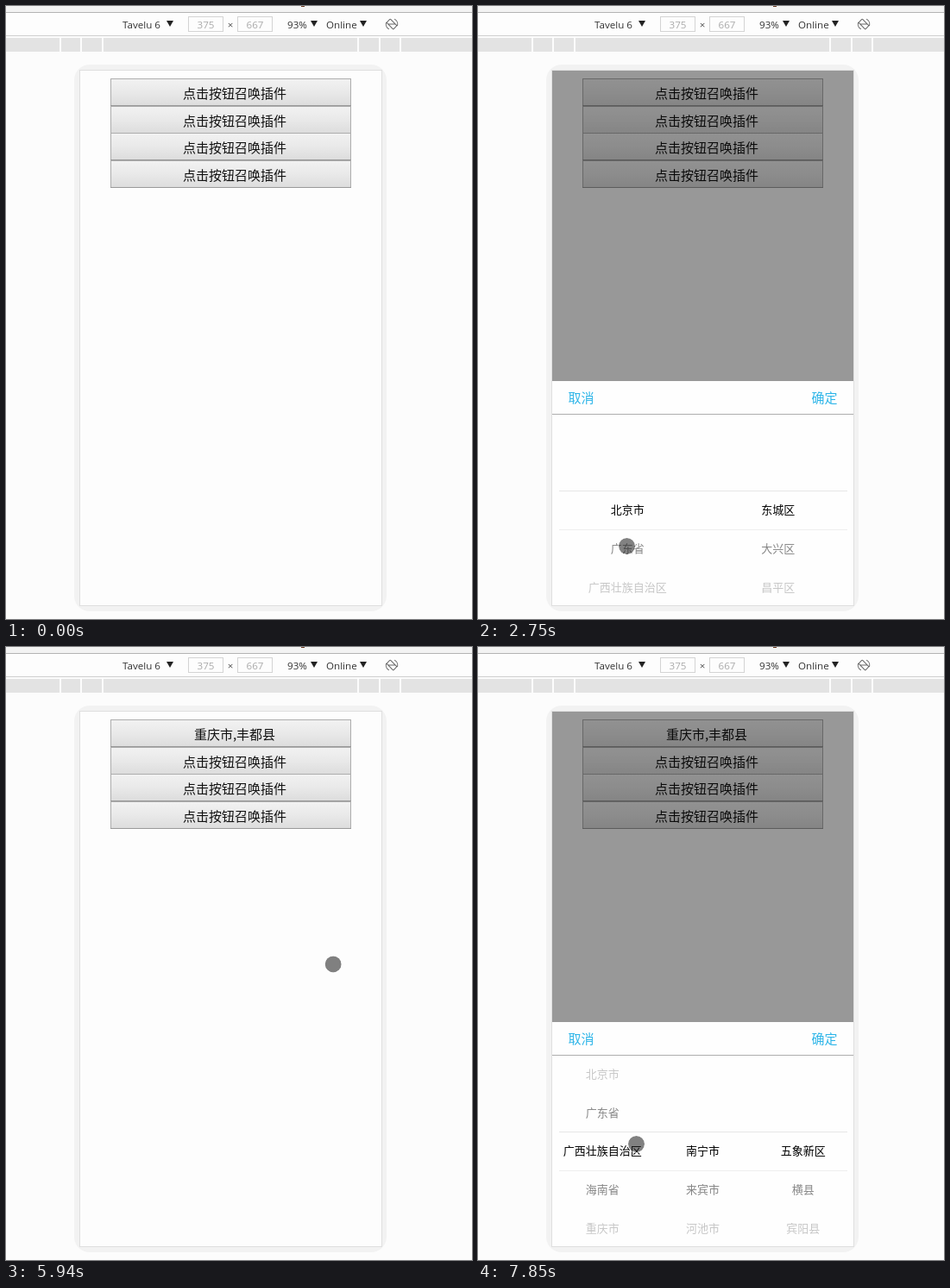
These frames come from a looping animation (540x711 px, 8000 ms). An HTML page with a canvas:

```html
<!DOCTYPE html>
<html lang="zh-CN">
<head>
<meta charset="utf-8">
<title>Picker</title>
<style>
html, body { margin: 0; width: 100%; height: 100%; overflow: hidden; background: #fcfcfc; }
canvas { display: block; }
</style>
</head>
<body>
<canvas id="stage" width="540" height="711"></canvas>
<script>
const c = document.getElementById('stage').getContext('2d');
const LOOP = 8000, ROW = 44.6;
const CJK = '"Noto Sans CJK SC", "Noto Sans CJK", sans-serif';
const LATIN = '"Open Sans", "Noto Sans", sans-serif';
const SCREEN = { x: 86, y: 75, w: 349, h: 620 };

// Runs of screen refreshes: first time, last time, count
const runs = [
  [0, 0, 1], [820, 1370, 5], [1940, 1940, 1], [2090, 2750, 6], [2900, 2900, 1],
  [3050, 3840, 7], [4110, 5110, 8], [5660, 5660, 1], [5940, 6340, 4],
  [6640, 6640, 1], [6770, 7610, 7], [7730, 7850, 2]
];
const ticks = runs.flatMap(([a, b, n]) =>
  Array.from({ length: n }, (_, i) => a + Math.floor(i * (b - a) / Math.max(1, n - 1))));

// Keyframes: time, then values
const cursorPath = [
  [820, 420, 150], [960, 330, 122], [1230, 226, 93], [1370, 236, 100], [1940, 236, 100],
  [2090, 235, 112], [2350, 215, 300], [2618, 176, 600], [2750, 172, 626], [2900, 172, 624],
  [3310, 172, 490], [3450, 190, 500], [3840, 359, 637], [3980, 359, 637], [4500, 357, 546],
  [4820, 432, 460], [5110, 416, 447], [5800, 416, 447], [6340, 272, 140], [6640, 257, 219],
  [7190, 185, 600], [7330, 182, 660], [7730, 183, 580], [7850, 183, 576]
];
const sheetTop = [
  [1800, 695], [1940, 655], [2090, 490], [2222, 435], [5659, 435],
  [5660, 695], [6500, 695], [6640, 505], [6770, 435]
];
const maskAlpha = [
  [1900, 0], [1940, .01], [2090, .25], [2222, .4], [5659, .4],
  [5660, 0], [6600, 0], [6640, .075], [6770, .35], [6910, .4]
];
const provinceScroll = [
  [2750, 0], [2900, .05], [3310, 3.1], [3700, 4],
  [6769, 4], [6770, 0], [7330, 0], [7610, 1.88], [7730, 1.97], [7850, 2]
];
const countyScroll = [[3980, 0], [4500, 1.9], [4640, 2]];

const words = s => s.split(' ');
const provinces = words('北京市 广东省 广西壮族自治区 海南省 重庆市 四川省 贵州省');
const beijing = words('东城区 大兴区 昌平区');
const chongqing = words('万州区 垫江县 丰都县 城口县 梁平县');
const cities = words('南宁市 来宾市 河池市');
const counties = words('五象新区 横县 宾阳县');

function at(track, t) {
  if (t <= track[0][0]) return track[0].slice(1);
  const i = track.findIndex(k => k[0] > t);
  if (i < 0) return track[track.length - 1].slice(1);
  const a = track[i - 1], b = track[i], u = (t - a[0]) / (b[0] - a[0]);
  return a.slice(1).map((v, j) => v + (b[j + 1] - v) * u);
}

function rect(x, y, w, h, fill) {
  c.fillStyle = fill;
  c.fillRect(x, y, w, h);
}

function frame(x, y, w, h, stroke) {
  c.strokeStyle = stroke;
  c.lineWidth = 1;
  c.strokeRect(x + .5, y + .5, w - 1, h - 1);
}

function clipTo(x, y, w, h) {
  c.save();
  c.beginPath();
  c.rect(x, y, w, h);
  c.clip();
}

// y is the visual middle of the line
function text(s, x, y, size, color, align = 'center', family = CJK) {
  c.font = `${size}px ${family}`;
  c.textAlign = align;
  c.fillStyle = color;
  c.fillText(s, x, y + size * .37);
}

function arrow(x) {
  c.fillStyle = '#222';
  c.beginPath();
  c.moveTo(x, 17);
  c.lineTo(x + 8, 17);
  c.lineTo(x + 4, 24);
  c.fill();
}

function rotateIcon() {
  c.save();
  c.translate(447, 21);
  c.rotate(-Math.PI / 4);
  c.strokeStyle = '#666';
  c.lineWidth = 1;
  c.beginPath();
  c.roundRect(-3, -5.5, 6, 11, 1);
  c.moveTo(-3, -3);
  c.lineTo(3, 3);
  c.stroke();
  for (const start of [-.3, Math.PI - .3]) {
    c.beginPath();
    c.arc(0, 0, 6.7, start, start + 1.4);
    c.stroke();
  }
  c.restore();
}

function toolbar() {
  rect(0, 0, 540, 7, '#f3f3f3');
  rect(342, 0, 4, 1, '#6b3a20');
  rect(0, 7, 540, 1, '#b4b4b4');
  rect(0, 8, 540, 26, '#fdfdfd');
  rect(0, 34, 540, 1, '#cfcfcf');
  rect(0, 37, 540, 16, '#e3e3e3');
  for (const x of [62, 86, 111, 407, 432, 456]) rect(x, 37, 2, 16, '#fcfcfc');
  const label = (s, x, color = '#333', align = 'left') => text(s, x, 21.5, 11.6, color, align, LATIN);
  label('Tavelu 6', 135);
  label('93%', 326);
  label('Online', 371);
  label('×', 260, '#555', 'center');
  for (const [s, x] of [['375', 211], ['667', 268]]) {
    frame(x, 12, 41, 18, '#d4d4d4');
    label(s, x + 20.5, '#aaa', 'center');
  }
  [186, 353, 410].forEach(arrow);
  rotateIcon();
}

function button(i, label, shade) {
  const y = Math.round(84 + i * 31.6), h = 32;
  const g = c.createLinearGradient(0, y, 0, y + h);
  g.addColorStop(0, '#f2f2f2');
  g.addColorStop(.5, '#e9e9e9');
  g.addColorStop(1, '#dcdcdc');
  rect(121, y, 279, h, g);
  frame(121, y, 279, h, '#adadad');
  rect(121, y + h - 1, 279, 1, '#999');
  if (shade) rect(122, y + 1, 277, h - 2, `rgba(0,0,0,${shade})`);
  text(label, 265, y + 17.5, 15, '#111');
}

function column(items, x, top, scroll) {
  items.forEach((item, i) => {
    const d = i - scroll;
    if (Math.abs(d) < 3) text(item, x, top + 149.5 + d * ROW, 13, `rgba(0,0,0,${.47 ** Math.abs(d)})`);
  });
}

function columnsAt(t) {
  const [left] = at(provinceScroll, t);
  if (t < 6770) {
    const [right] = at(countyScroll, t);
    return [[provinces, left], [t < 3840 ? beijing : chongqing, right]];
  }
  return t < 7850
    ? [[provinces, left], [['北京市'], 0], [beijing, 0]]
    : [[provinces, left], [cities, 0], [counties, 0]];
}

function sheet(t) {
  const [top] = at(sheetTop, t);
  if (top >= 695) return;
  rect(86, top, 349, 260, '#fefefe');
  text('取消', 119.5, top + 19.5, 15, '#2db5e8');
  text('确定', 401.5, top + 19.5, 15, '#2db5e8');
  rect(86, top + 38, 349, 1, '#adadad');
  clipTo(86, top + 39, 349, 221);
  rect(94, top + 127, 334, 1, '#e6e6e6');
  rect(94, top + 172, 334, 1, '#eee');
  const cols = columnsAt(t);
  cols.forEach(([items, scroll], i) =>
    column(items, 86 + SCREEN.w * (i + .5) / cols.length, top, scroll));
  c.restore();
}

function cursor(t) {
  if (t < 820) return;
  const [x, y] = at(cursorPath, t);
  c.beginPath();
  c.arc(x + .5, y + .5, 9.5, 0, 7);
  c.fillStyle = 'rgba(30,30,30,.56)';
  c.fill();
  c.beginPath();
  c.arc(x + .5, y + .5, 10, 0, 7);
  c.strokeStyle = 'rgba(255,255,255,.6)';
  c.lineWidth = 1;
  c.stroke();
}

function draw(time) {
  const t = ticks.filter(k => k <= time).pop();
  rect(0, 0, 540, 711, '#fcfcfc');
  toolbar();
  c.fillStyle = '#f2f2f2';
  c.beginPath();
  c.roundRect(79, 68, 362, 634, 18);
  c.fill();
  frame(85, 74, 351, 622, '#dfdfdf');

  const { x, y, w, h } = SCREEN;
  clipTo(x, y, w, h);
  rect(x, y, w, h, '#fdfdfd');
  const shade = t === 1940 ? .04 : 0;
  for (let i = 0; i < 4; i++) {
    button(i, i === 0 && t >= 5660 ? '重庆市,丰都县' : '点击按钮召唤插件', shade);
  }
  rect(x, y, w, h, `rgba(0,0,0,${at(maskAlpha, t)[0]})`);
  sheet(t);
  cursor(t);
  c.restore();
}

function tick() {
  draw(performance.now() % LOOP);
  requestAnimationFrame(tick);
}
tick();
</script>
</body>
</html>
```
